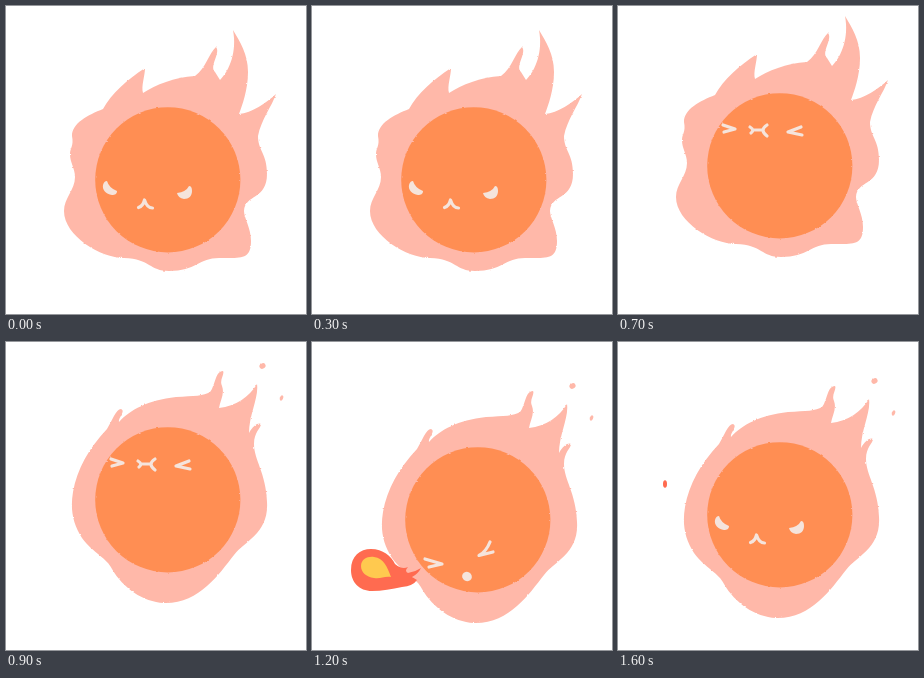
Animation, 300 px wide and 308 px high, one loop 1.7 s. Source, as an HTML page:

```html
<!DOCTYPE html>
<html lang="en">
<head>
<meta charset="utf-8">
<title>Fireball</title>
<style>
  html, body { margin: 0; width: 100%; height: 100%; overflow: hidden; background: #fff; }
  svg { display: block; width: 100vw; height: 100vh; }
  .flame { fill: #ffb8a9; }
  .face path { fill: none; stroke: #f5e4dc; stroke-width: 3.2; stroke-linecap: round; stroke-linejoin: round; }
  .face .solid { fill: #f5e4dc; stroke: none; }
  .ball { fill: #ff6b50; }
  .core { fill: #ffc94f; }
</style>
</head>
<body>
<svg viewBox="0 0 300 308">
  <filter id="chalk" x="-10%" y="-10%" width="120%" height="120%" color-interpolation-filters="sRGB">
    <feTurbulence type="fractalNoise" baseFrequency=".3" numOctaves="2" seed="4"/>
    <feDisplacementMap in="SourceGraphic" scale="2" xChannelSelector="R" yChannelSelector="G"/>
  </filter>

  <g id="body">
    <g class="flame" filter="url(#chalk)">
      <path d="M64 148C64 142 68 140 66 130C66 117 82 109 97 103C105 88 122 73 139 62C139 70 135 80 137 87C150 79 168 71 189 70C200 62 203 47 210 41C215 47 203 60 209 66L214 74C224 64 231 45 227 24C234 36 242 48 242 66C242 84 236 100 233 108C246 107 260 97 270 88C266 100 255 114 252 130C252 145 261 147 261 168C261 194 239 188 238 205C238 212 245 222 245 235C245 254 235 252 213 252C193 252 190 265 163 265C143 265 145 253 118 252C95 252 58 230 58 205C58 192 69 184 69 171C69 162 64 157 64 148Z"/>
    </g>
    <g class="flame" filter="url(#chalk)">
      <path d="M65 166C65 143 85 121 100 105C105 92 116 78 125 72C126 80 122 86 124 93C145 79 170 73 195 70C207 66 206 48 214 42C218 50 211 62 213 76C227 70 240 58 240 39C248 56 244 82 238 106C247 105 255 99 262 92C254 104 247 112 249 126C252 142 261 150 261 174C261 197 243 200 238 211C233 222 238 236 224 245C205 255 190 271 162 271C140 271 128 261 115 252C100 244 78 238 68 219C58 199 66 184 65 166Z"/>
    </g>
    <g class="flame" filter="url(#chalk)" transform="translate(0 1)">
      <path d="M101 102C106 94 110 82 115 82C120 84 112 91 113 95C124 83 142 73 170 70C188 69 198 69 204 65C209 60 209 44 217 44C219 47 213 53 216 59C219 67 214 74 213 81C230 79 243 70 251 57C253 70 243 88 243 106C247 98 253 95 255 97C255 101 248 105 248 117C248 133 260 146 261 175C263 206 239 214 228 228C213 247 193 277 158 276C137 275 117 261 106 242C101 231 87 226 76 211C67 197 64 183 67 165C71 142 83 121 101 102Z"/>
      <ellipse rx="3.2" ry="2.6" transform="translate(256.500 39) rotate(-30)"/>
      <ellipse rx="1.6" ry="2.8" transform="translate(275.500 71) rotate(25)"/>
    </g>
    <circle cx="161.800" cy="173.800" r="72.600" fill="#ff8e53" filter="url(#chalk)"/>
  </g>

  <g class="face">
    <path class="solid" d="M101 175Q103 182 111 185C111 188 109 189 106 189C100 188 96 184 97 179Q98 175 101 175Z"/>
    <path class="solid" d="M171 187Q180 186 183 180Q186 180 186 185C186 190 183 193 178 193Q172 192 171 187Z"/>
    <path d="M132.500 201.500Q137 200 138.500 194Q141 202 146.500 202"/>
  </g>
  <g class="face">
    <path d="M108 118L117 124L106 129M129 124Q133 126 133 128Q133 130 130 132M133 128Q139 127 144 129M149 125Q143 127 147 133M186 126L173 129L179 133"/>
  </g>
  <g class="face">
    <path d="M105 117L117 121L106 124M132 119Q137 122 133 125M135 122H145M149 117Q141 122 149 128M183 119L170 124L184 127"/>
  </g>
  <g class="face">
    <path d="M113 217L130 222L117 225M178 200Q174 210 167 213.500L181 210"/>
    <ellipse class="solid" rx="5" ry="4.500" transform="translate(155 234.500) rotate(30)"/>
  </g>

  <g class="ball">
    <path d="M39 228C39 214 48 207 59 207C71 207 79 214 83 222Q90 228 96 225Q92 229 96 231Q103 230 109 226Q106 232 100 235L105 238Q101 244 90 245C80 247 70 249 60 249C47 249 39 240 39 228Z"/>
    <path class="core" d="M49 224C49 217 56 214 62 215C72 216 75 225 79 235C72 234 69 237 62 236C54 235 49 230 49 224Z"/>
  </g>
  <g class="ball">
    <path d="M34 201C34 186 43 178 53 178C65 179 66 190 67 200Q71 207 75 206Q72 210 77 216Q71 214 70 217L71 222Q63 218 56 219C43 219 34 212 34 201Z"/>
    <path class="core" d="M42 197C42 189 47 186 52 188C59 191 57 200 60 207C51 208 42 206 42 197Z"/>
  </g>
  <g class="ball">
    <path d="M54 160C54 168 51 171 54 176C57 184 55 191 52 196L56 198L50 203C42 200 36 194 36 184C36 173 47 169 54 160Z"/>
  </g>
  <g class="ball">
    <path d="M49 145C49 152 53 155 51 161C50 166 47 169 43 167C38 160 47 154 49 145Z"/>
  </g>
  <g class="ball"><ellipse cx="47" cy="142" rx="2" ry="3.800"/></g>
</svg>
<script>
const all = selector => [...document.querySelectorAll(selector)];
const body = document.getElementById('body');
const flames = all('g.flame'), faces = all('g.face'), balls = all('g.ball');
const STEP = 100, FIRST_BALL = 12;
const ANGRY = 0, SQUINT = 1, STRAIN = 2, SPIT = 3;

// flame, body x, body y, face, face x, face y
const poses = [
  [0, 0, 0, ANGRY, 0, 0],
  [1, 0, 0, ANGRY, 0, 0],
  [2, 0, -1, ANGRY, 0, -1],
  [0, 0, 0, ANGRY, 0, 0],
  [1, 0, -3, ANGRY, 0, -15],
  [1, 0, -8, SQUINT, 0, 22],
  [2, 0, -13, SQUINT, 0, 0],
  [0, 0, -14, STRAIN, 0, 2],
  [1, 0, -15, SQUINT, 0, -3],
  [2, 0, -16, STRAIN, 0, 0],
  [0, 0, -14, SQUINT, 0, -1],
  [1, 1, -5, SPIT, -2, -50],
  [2, 4, 4, SPIT, 0, 0],
  [1, 2, 2, SPIT, -2, -16],
  [0, 0, 0, ANGRY, 0, 0],
  [1, 0, 0, ANGRY, 0, 0],
  [2, 0, -1, ANGRY, 0, -1]
];

const move = (el, x, y) => el.setAttribute('transform', `translate(${x} ${y})`);
const showOnly = (list, index) =>
  list.forEach((el, i) => { el.style.display = i === index ? '' : 'none'; });

function draw(time) {
  const step = Math.floor(time / STEP) % poses.length;
  const [flame, x, y, face, faceX, faceY] = poses[step];
  showOnly(flames, flame);
  showOnly(faces, face);
  showOnly(balls, step - FIRST_BALL);
  move(body, x, y);
  move(faces[face], faceX, faceY);
}

const start = performance.now();
function tick() {
  draw(performance.now() - start);
  requestAnimationFrame(tick);
}
tick();
</script>
</body>
</html>
```
